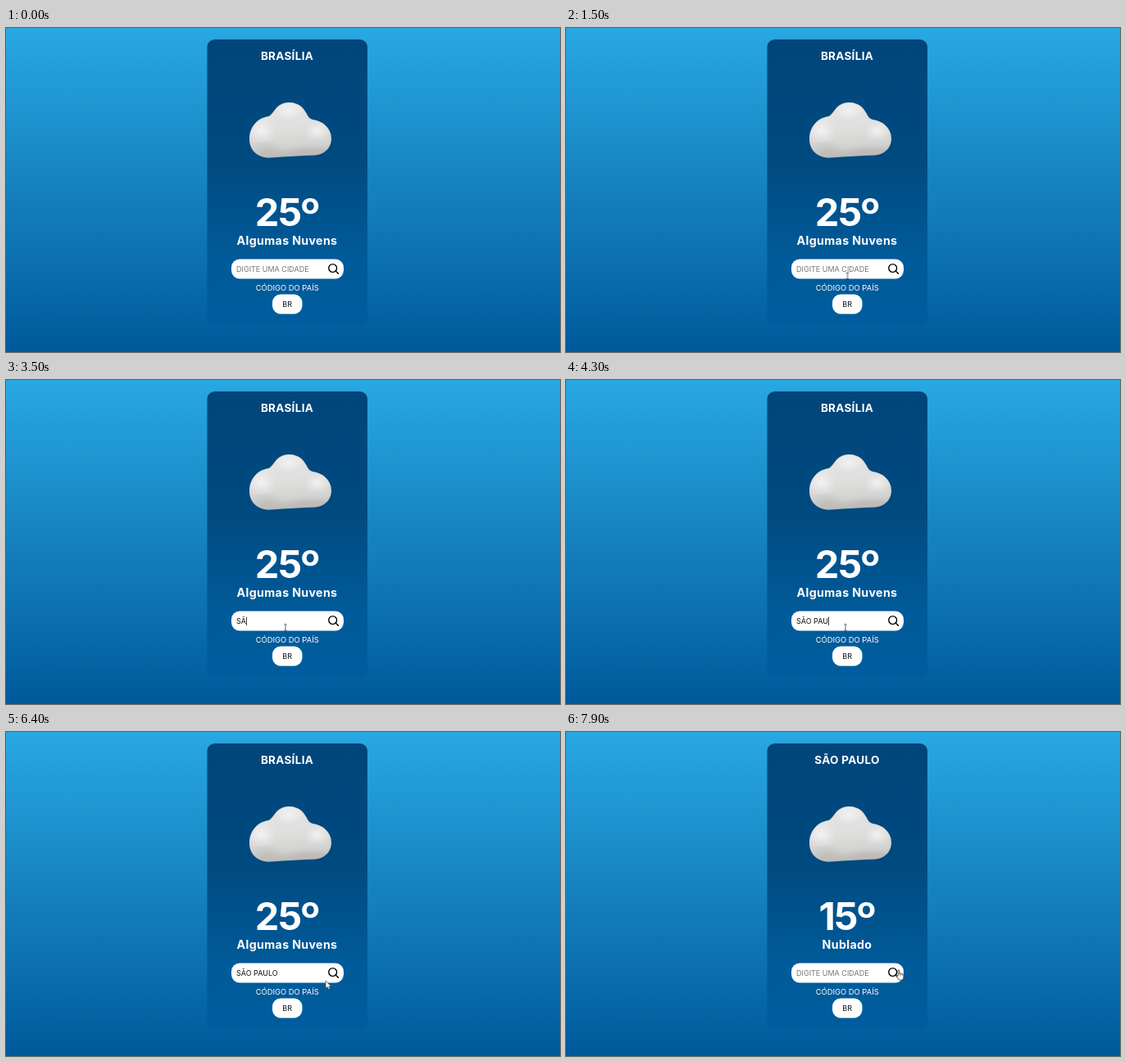
These frames come from a looping animation (676 by 396 pixels, 8000 ms). An HTML page:

```html
<!DOCTYPE html>
<html lang="pt-BR">
<head>
<meta charset="utf-8">
<title>Clima</title>
<style>
  html, body { margin: 0; width: 100%; height: 100%; overflow: hidden; background: #0b6fb0; }
  svg { display: block; width: 100%; height: 100%; font-family: Inter, "Open Sans", sans-serif; }
  text { white-space: pre; }
  .mid { text-anchor: middle; fill: #fff; }
  .bold { font-weight: 700; }
  .city { font-size: 13.5px; letter-spacing: .3px; }
  .temp { font-size: 47px; letter-spacing: -1.5px; }
  .sky { font-size: 14.2px; letter-spacing: .35px; }
  .small { font-size: 9px; }

  .before, .after, #cursor, #cursor g { animation: 8s infinite step-end; }
  .before { animation-name: before; }
  .after { animation-name: after; }
  #cursor { animation-name: move; animation-timing-function: linear; }
  #cursor .arrow { animation-name: arrow; }
  #cursor .beam { animation-name: beam; }
  #cursor .hand { animation-name: hand; }

  @keyframes before { 0% { visibility: visible } 97.5%, 100% { visibility: hidden } }
  @keyframes after { 0% { visibility: hidden } 97.5%, 100% { visibility: visible } }
  @keyframes arrow {
    0% { visibility: hidden } 11.25% { visibility: visible } 16.25% { visibility: hidden }
    70% { visibility: visible } 82.5%, 100% { visibility: hidden }
  }
  @keyframes beam {
    0% { visibility: hidden } 16.25% { visibility: visible } 70%, 100% { visibility: hidden }
  }
  @keyframes hand { 0% { visibility: hidden } 82.5%, 100% { visibility: visible } }
  @keyframes move {
    0%, 11.25% { transform: translate(600px, 309px) }
    13.75% { transform: translate(490px, 301px) }
    16.25% { transform: translate(385px, 298px) }
    18.75% { transform: translate(343.5px, 303px) }
    21.25%, 69.99% { transform: translate(341px, 302.5px) }
    70% { transform: translate(358px, 312px) }
    80% { transform: translate(390px, 304px) }
    83.75% { transform: translate(401px, 296px) }
    92.5%, 96.25% { transform: translate(403px, 294px) }
    98.75%, 100% { transform: translate(406px, 290.5px) }
  }
</style>
</head>
<body>
<svg viewBox="0 0 676 396" preserveAspectRatio="none">
  <defs>
    <linearGradient id="bg" x2="0" y2="1">
      <stop stop-color="#29a8e2"/>
      <stop offset="1" stop-color="#005a9a"/>
    </linearGradient>
    <linearGradient id="card" x2="0" y2="1">
      <stop stop-color="#00467a"/>
      <stop offset=".42" stop-color="#004a80"/>
      <stop offset=".75" stop-color="#005a98"/>
      <stop offset="1" stop-color="#005d9e"/>
    </linearGradient>
    <linearGradient id="cloud" x2=".12" y2="1">
      <stop stop-color="#e6e6e5"/>
      <stop offset=".55" stop-color="#dededd"/>
      <stop offset=".85" stop-color="#d2d2d0"/>
      <stop offset="1" stop-color="#bdbbb8"/>
    </linearGradient>
    <radialGradient id="glow">
      <stop stop-color="#f3f3f3" stop-opacity=".9"/>
      <stop offset="1" stop-color="#f3f3f3" stop-opacity="0"/>
    </radialGradient>
    <radialGradient id="shade">
      <stop stop-color="#b9b8b6" stop-opacity=".65"/>
      <stop offset="1" stop-color="#b9b8b6" stop-opacity="0"/>
    </radialGradient>
    <path id="puff" d="M297 136C297 121 307 110 320 108C327 106 329 91 345 91C359 91 364 99 368 107C370 111 374 112 379 113C390 116 397 125 397 135C397 147 388 155 376 155.500C360 156 342 157 322 158.500C307 159 297 149 297 136Z"/>
    <clipPath id="inside"><use href="#puff"/></clipPath>
  </defs>

  <rect width="676" height="396" fill="url(#bg)"/>
  <rect x="245.500" y="14" width="195.500" height="350" rx="9" fill="url(#card)"/>

  <use href="#puff" fill="url(#cloud)"/>
  <g clip-path="url(#inside)">
    <ellipse cx="318" cy="151" rx="26" ry="14" fill="url(#shade)"/>
    <ellipse cx="367" cy="152" rx="34" ry="9" fill="url(#shade)"/>
    <ellipse cx="312" cy="125" rx="18" ry="16" fill="url(#glow)"/>
    <ellipse cx="345" cy="101" rx="17" ry="12" fill="url(#glow)"/>
    <ellipse cx="380" cy="126" rx="15" ry="13" fill="url(#glow)"/>
  </g>

  <g class="before">
    <text class="mid bold city" x="343" y="39">BRASÍLIA</text>
    <text class="mid bold temp" x="342.500" y="241.500">25º</text>
    <text class="mid bold sky" x="343" y="265.300">Algumas Nuvens</text>
  </g>
  <g class="after">
    <text class="mid bold city" x="343" y="39">SÃO PAULO</text>
    <text class="mid bold temp" x="342.500" y="241.500">15º</text>
    <text class="mid bold sky" x="343" y="265.300">Nublado</text>
  </g>

  <rect x="275" y="282.500" width="137" height="24" rx="10" fill="#fff"/>
  <text id="hint" class="small" x="281" y="297.800" fill="#757575">DIGITE UMA CIDADE</text>
  <text id="typed" class="small" x="281" y="297.800" fill="#111"></text>
  <rect id="caret" y="289.500" width=".8" height="10.500" fill="#111" visibility="hidden"/>
  <g fill="none" stroke="#000" stroke-width="1.400" stroke-linecap="round">
    <circle cx="398.700" cy="293.500" r="4.900"/>
    <path d="M402.300 297.100L405.500 300.200"/>
  </g>

  <text class="mid" x="343.200" y="320.600" font-size="9.400">CÓDIGO DO PAÍS</text>
  <rect x="325" y="325.500" width="36.500" height="24" rx="10" fill="#fff"/>
  <text class="small" x="343.200" y="340.800" text-anchor="middle" fill="#111">BR</text>

  <g id="cursor">
    <g class="arrow">
      <path d="M0 0V9.500L2.200 7.600L3.700 10.800L5.300 10.100L3.900 7H6.800Z" fill="#fff" stroke="#222" stroke-width=".6"/>
    </g>
    <g class="beam">
      <path d="M-1.700-3.800H1.700M0-3.800V3.800M-1.700 3.800H1.700" fill="none" stroke="#333" stroke-width=".8"/>
    </g>
    <g class="hand">
      <path d="M-.9 1Q0-.4 .9 1V5Q1.800 4 2.700 5Q3.600 4.300 4.400 5.400Q5.600 4.900 6 6.200V9Q6 10.600 5 12.500H.2Q-.9 10.500-3 7.900Q-2.700 6.500-.9 7.800Z" fill="#fff" stroke="#111" stroke-width=".7" stroke-linejoin="round"/>
      <path d="M.9 5V7M2.700 5.200V7.200M4.400 5.600V7.400" fill="none" stroke="#111" stroke-width=".5"/>
    </g>
  </g>
</svg>
<script>
  const LOOP = 8000, FOCUS = 1900, BLUR = 5600, RESULT = 7800, BLINK = 500;
  const query = "SÃO PAULO";
  const keyTimes = [3000, 3500, 3600, 3800, 4000, 4200, 4300, 4600, 4800];
  const [hint, typed, caret] = ["hint", "typed", "caret"].map(id => document.getElementById(id));
  const show = (el, on) => el.setAttribute("visibility", on ? "visible" : "hidden");
  let start;

  function draw(now) {
    start ??= now;
    const t = (now - start) % LOOP;
    const count = t < RESULT ? keyTimes.filter(k => k <= t).length : 0;
    const value = query.slice(0, count);
    if (typed.textContent !== value) typed.textContent = value;
    show(hint, !count);

    // The blink restarts at every key press
    const since = t - (count ? keyTimes[count - 1] : FOCUS);
    const lit = Math.floor(since / BLINK) % 2 === 0;
    show(caret, t >= FOCUS && t < BLUR && lit);
    caret.setAttribute("x", 281.2 + (count ? typed.getComputedTextLength() : 0));
    requestAnimationFrame(draw);
  }
  requestAnimationFrame(draw);
</script>
</body>
</html>
```
